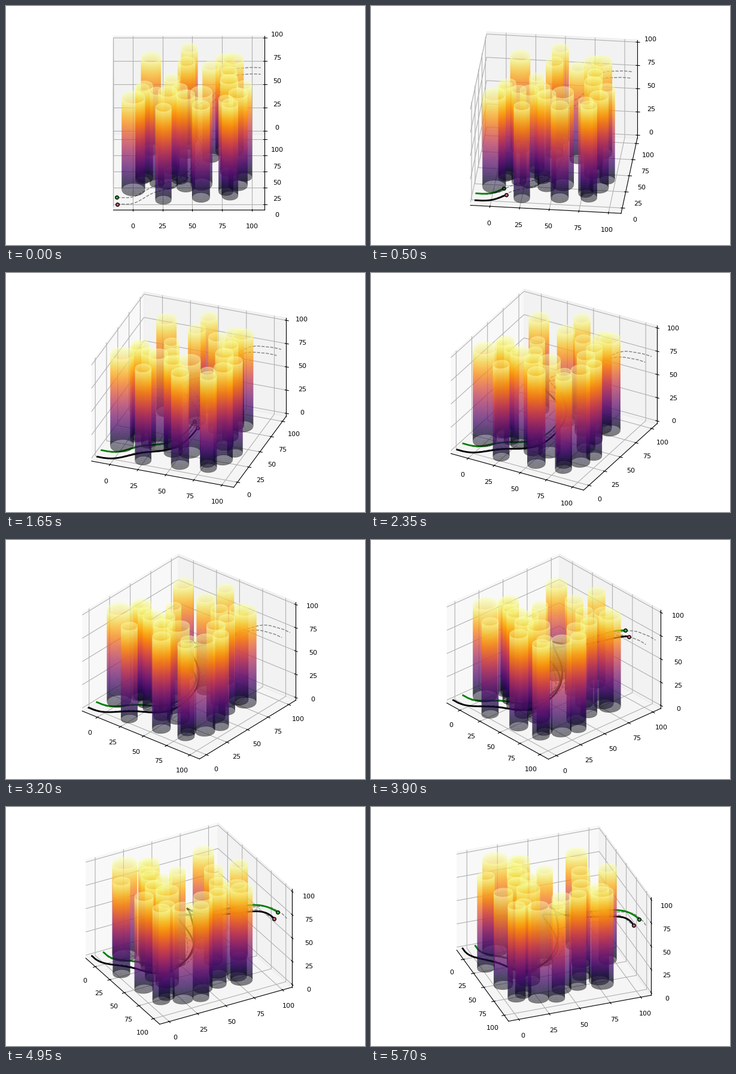
A matplotlib script that plays this animation: 600 by 400 pixels, repeating every 5.75 s.

```python
import matplotlib.pyplot as plt
import numpy as np
from matplotlib.animation import FuncAnimation
from mpl_toolkits.mplot3d.art3d import Poly3DCollection

FRAMES, INTERVAL = 115, 50
ARRIVAL = 84      # step at which the pair stops
CRUISE = 70       # flying height after the climb
HEIGHT, BANDS, ALPHA = 100, 49, 0.5

# pillar centres, widest first
SITES = np.array([
    (.5, 17.3), (57.6, 25.5), (84.3, 77.3), (15.3, 79.1), (29.4, 26),
    (88.3, 23.6), (77.2, 76.8), (44.5, 21.3), (80.8, 45), (57.2, 5.2),
    (45, 72.7), (9.7, 35.2), (65.6, 66.2), (47.5, 93.9), (81.5, 8),
    (25.7, 1.5), (80.8, 58.3), (39.4, 32), (93.6, 36.7), (32.9, 47.2),
    (78.1, 14.5), (20.3, 26.9), (8.2, 32),
])
rank = np.linspace(1, 0, len(SITES))
RADII = 6 + 2.5 * rank + 1.3 * rank**12

# ground plan of the flight
ROUTE = np.array([
    (-13, .5), (1, 2), (17, 17.5), (33, 26), (45, 33), (54, 41), (58, 48),
    (51, 50), (41, 48), (51, 46), (62, 50), (70, 63), (80, 94), (96, 100.4),
    (107.3, 100.4),
])


def ease(t):
    t = np.clip(t, 0, 1)
    return t * t * (3 - 2 * t)


def hermite(pts, n=12):
    """Smooth curve through all points."""
    tan = np.gradient(pts, axis=0)
    t = np.linspace(0, 1, n, endpoint=False)[:, None]
    w = ease(t)
    parts = [a + w * (b - a) + t * (1 - t)**2 * ta - t**2 * (1 - t) * tb
             for a, b, ta, tb in zip(pts, pts[1:], tan, tan[1:])]
    return np.vstack(parts + [pts[-1:]])


climb = CRUISE * ease((np.arange(len(ROUTE)) - 3) / 7)
plan = hermite(np.column_stack([ROUTE, climb]))
arc = np.r_[0, np.cumsum(np.linalg.norm(np.diff(plan, axis=0), axis=1))]


def flown(step):
    """Centre of the pair, cutting the corners of the plan."""
    s = (arc[-1] - 9) * step / ARRIVAL
    half = min(7, s, arc[-1] - s)
    window = s + np.linspace(-half, half, 15)
    return [np.interp(window, arc, c).mean() for c in plan.T]


def trailing_mean(v, n):
    padded = np.r_[np.full(n - 1, v[0]), v]
    return np.convolve(padded, np.ones(n) / n, "valid")


steps = np.linspace(0, ARRIVAL, 2 * ARRIVAL + 1)
centre = np.array([flown(k) for k in steps])
dx, dy, _ = np.gradient(centre, axis=0).T
heading = trailing_mean(np.unwrap(np.arctan2(dy, dx)), 32)
side = 5.3 * np.column_stack([-np.sin(heading), np.cos(heading), 0 * heading])
tracks = [centre + side, centre - side]

fig = plt.figure(figsize=(6, 4), dpi=100)
ax = fig.add_axes([.0005, .007, 1, .984], projection="3d", proj_type="ortho")
ax.tick_params(labelsize=8, pad=4)

for shift in (5, -5):
    ax.plot(*(plan + [0, shift, 0]).T, "--", color="gray", lw=1)
trails = [ax.plot([], [], [], color=c, lw=2)[0] for c in ("green", "black")]
drones = [ax.plot([], [], [], "o", ms=4, mfc=c, mec="black", mew=1)[0]
          for c in ("#2fb42f", "#d2607c")]

levels = np.linspace(0, HEIGHT, BANDS + 1)
shades = plt.get_cmap("inferno")(np.linspace(0, 1, BANDS))
shades[:, 3] = ALPHA


def walls(site, r, azim):
    """Bands of the far and the near half of a pillar."""
    bands = []
    for turn in (180, 0):
        a = np.radians(azim + turn + np.linspace(-90, 90, 15))
        rim = site + r * np.column_stack([np.cos(a), np.sin(a)])
        loop = np.vstack([rim, rim[::-1]])
        bands += [np.column_stack([loop, np.repeat([lo, hi], len(a))])
                  for lo, hi in zip(levels, levels[1:])]
    return bands


pillars = []
for site, r in zip(SITES, RADII):
    pillar = Poly3DCollection(walls(site, r, -90), linewidths=0,
                              facecolors=np.vstack([shades, shades]))
    ax.add_collection3d(pillar)
    pillars.append(pillar)

ax.set_xlim(-16.5, 110.6)
ax.set_ylim(-8.33, 108.33)
ax.set_zlim(-3.2, 102.5)
for axis in (ax.xaxis, ax.yaxis, ax.zaxis):
    axis.set_ticks(range(0, 101, 25))


def update(i):
    azim = -90 + 70 * i / (FRAMES - 1)
    ax.view_init(elev=30, azim=azim)
    for site, r, pillar in zip(SITES, RADII, pillars):
        pillar.set_verts(walls(site, r, azim))
    last = 2 * min(i, ARRIVAL)
    for track, trail, drone in zip(tracks, trails, drones):
        trail.set_data_3d(*track[:last + 1].T)
        drone.set_data_3d(*track[last:last + 1].T)
    return trails + drones + pillars


anim = FuncAnimation(fig, update, frames=FRAMES, interval=INTERVAL,
                     repeat=True, repeat_delay=0, blit=False)
plt.show()
```
